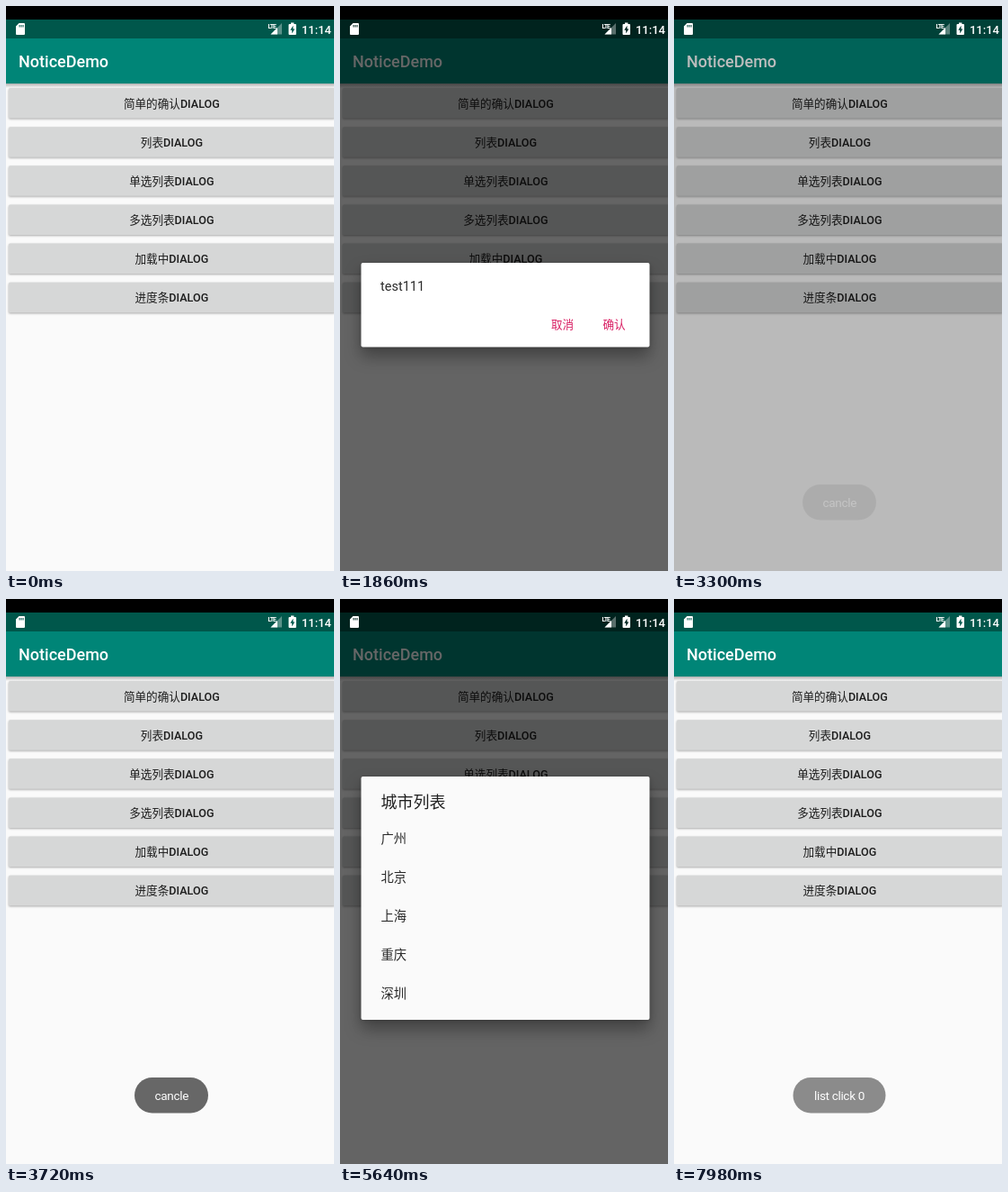
Recreate the animation shown at these times as an HTML page. Size 365 by 627 pixels, loop 8000 ms.

```html
<!DOCTYPE html>
<html lang="zh-CN">
<head>
<meta charset="utf-8">
<title>NoticeDemo</title>
<style>
html, body { margin: 0; width: 100%; height: 100%; overflow: hidden; background: #000; }
svg { display: block; width: 100vw; height: 100vh; }
text { font-family: Roboto, "Noto Sans CJK SC", "Noto Sans CJK", "Noto Sans", sans-serif; }
.label { font-size: 12.6px; font-weight: 500; fill: #1d1d1d; text-anchor: middle; }
.label tspan { font-weight: 400; }
.button { fill: #d6d7d7; filter: drop-shadow(0 1px 1px rgba(0,0,0,.32)); }
.panel { filter: drop-shadow(0 10px 9px rgba(0,0,0,.3)) drop-shadow(0 1px 2px rgba(0,0,0,.2)); }
.action { font-size: 12.6px; fill: #d81b60; }
.item { font-size: 14.3px; fill: #2a2a2a; }
.heading { font-size: 18px; fill: #212121; }
.toast text { font-size: 13.6px; letter-spacing: -.35px; fill: #fff; text-anchor: middle; }
.toast rect { fill: #666; }
</style>
</head>
<body>
<svg viewBox="0 0 365 627" preserveAspectRatio="none">
  <defs>
    <linearGradient id="shade" x2="0" y2="1">
      <stop offset="0" stop-color="#000" stop-opacity=".3"/>
      <stop offset="1" stop-color="#000" stop-opacity="0"/>
    </linearGradient>
  </defs>
  <rect width="365" height="627" fill="#000"/>
  <rect y="15" width="365" height="612" fill="#fafafa"/>
  <g id="buttons"></g>
  <rect y="86" width="365" height="5" fill="url(#shade)"/>
  <rect y="36" width="365" height="50" fill="#008577"/>
  <text x="14" y="68" font-size="18" font-weight="500" fill="#fff">NoticeDemo</text>
  <rect y="15" width="365" height="21" fill="#00574b"/>
  <rect id="dim" y="15" width="365" height="612" fill="#000" opacity="0"/>

  <g fill="#fff">
    <path fill-rule="evenodd" d="M14.5 19H20q1 0 1 1V31q0 1-1 1H12q-1 0-1-1V22.5ZM14.6 21v2.4h1V21ZM16.6 21v2.4h1V21ZM18.6 21v2.4h1V21Z"/>
    <path d="M307 19V31.5H294.5Z" opacity=".35"/>
    <path d="M302 24V31.5H294.5Z"/>
    <text x="291.5" y="24.5" font-size="7" font-weight="700" letter-spacing="-.9">LTE</text>
    <path fill-rule="evenodd" d="M317 18.5h3.4v1.4H322q1 0 1 1V31q0 1-1 1H315.500q-1 0-1-1V20.900q0-1 1-1H317ZM319.500 21.800L316.300 26.800H318.200V30.400L321.300 25.400H319.500Z"/>
    <text x="362" y="30.700" font-size="13" font-weight="500" text-anchor="end">11:14</text>
  </g>

  <g id="confirm">
    <rect class="panel" x="23.500" y="285" width="321" height="93.500" rx="2" fill="#fff"/>
    <text class="item" x="45" y="316" style="font-size:14.5px">test111</text>
    <text class="action" x="235" y="358">取消</text>
    <text class="action" x="292.500" y="358">确认</text>
  </g>
  <g id="list">
    <rect class="panel" x="23.500" y="197" width="321" height="270" rx="2" fill="#fafafa"/>
    <text class="heading" x="45.500" y="232">城市列表</text>
  </g>
  <g id="cancelToast" class="toast">
    <rect x="143" y="531" width="82" height="39.500" rx="19.700"/>
    <text x="184.300" y="556">cancle</text>
  </g>
  <g id="clickToast" class="toast">
    <rect x="132.500" y="531" width="103" height="39.500" rx="19.700"/>
    <text x="184" y="556">list click 0</text>
  </g>
</svg>
<script>
const $ = id => document.getElementById(id);
const LOOP = 8000, TICK = 60, DIM = 0.6;

function add(parent, tag, attrs, text = '') {
  const el = document.createElementNS('http://www.w3.org/2000/svg', tag);
  for (const key in attrs) el.setAttribute(key, attrs[key]);
  el.textContent = text;
  parent.append(el);
  return el;
}

['简单的确认', '列表', '单选列表', '多选列表', '加载中', '进度条'].forEach((name, i) => {
  const y = 91 + i * 43.15;
  add($('buttons'), 'rect', { class: 'button', x: 3, y, width: 363, height: 33.5, rx: 1.5 });
  const label = add($('buttons'), 'text', { class: 'label', x: 184.4, y: y + 21.6 });
  add(label, 'tspan', {}, name);
  label.append('DIALOG');
});

['广州', '北京', '上海', '重庆', '深圳'].forEach((city, i) =>
  add($('list'), 'text', { class: 'item', x: 45.5, y: 271.3 + i * 43 }, city));

const dialogs = [
  { el: $('confirm'), cy: 331.7, open: 1230, close: 3090, shown: 3180 },
  { el: $('list'), cy: 332, open: 5130, close: 7559, shown: 7680 }
];
const toasts = [
  { el: $('cancelToast'), start: 3260, end: 5150 },
  { el: $('clickToast'), start: 7730, end: 9700 }
];

const ramp = (t, start, length) => Math.min(1, Math.max(0, (t - start) / length));
const easeOut = (x, power = 2) => 1 - (1 - x) ** power;

function fade(el, alpha) {
  el.setAttribute('opacity', alpha.toFixed(3));
  el.style.display = alpha > 0 ? '' : 'none';
}

function draw(t) {
  let dim = 0;
  for (const d of dialogs) {
    // the dialog vanishes first, then the dim layer follows
    const closing = t >= d.shown;
    const alpha = closing ? 1 - ramp(t, d.close, 150) : easeOut(ramp(t, d.open, 180));
    const scale = 0.9 + 0.1 * easeOut(ramp(t, d.open, 300), 4);
    dim += closing ? 1 - ramp(t, d.close + 85, 220) : ramp(t, d.open, 300);
    fade(d.el, alpha);
    d.el.setAttribute('transform',
      `translate(184 ${d.cy}) scale(${scale}) translate(-184 ${-d.cy})`);
  }
  fade($('dim'), dim * DIM);
  for (const s of toasts)
    fade(s.el, easeOut(ramp(t, s.start, 500)) * (1 - ramp(t, s.end, 480) ** 2));
}

const origin = performance.now();
function frame() {
  const t = Math.max(0, performance.now() - origin) % LOOP;
  draw(Math.floor((t + 1) / TICK) * TICK);
  requestAnimationFrame(frame);
}
draw(0);
requestAnimationFrame(frame);
</script>
</body>
</html>
```
